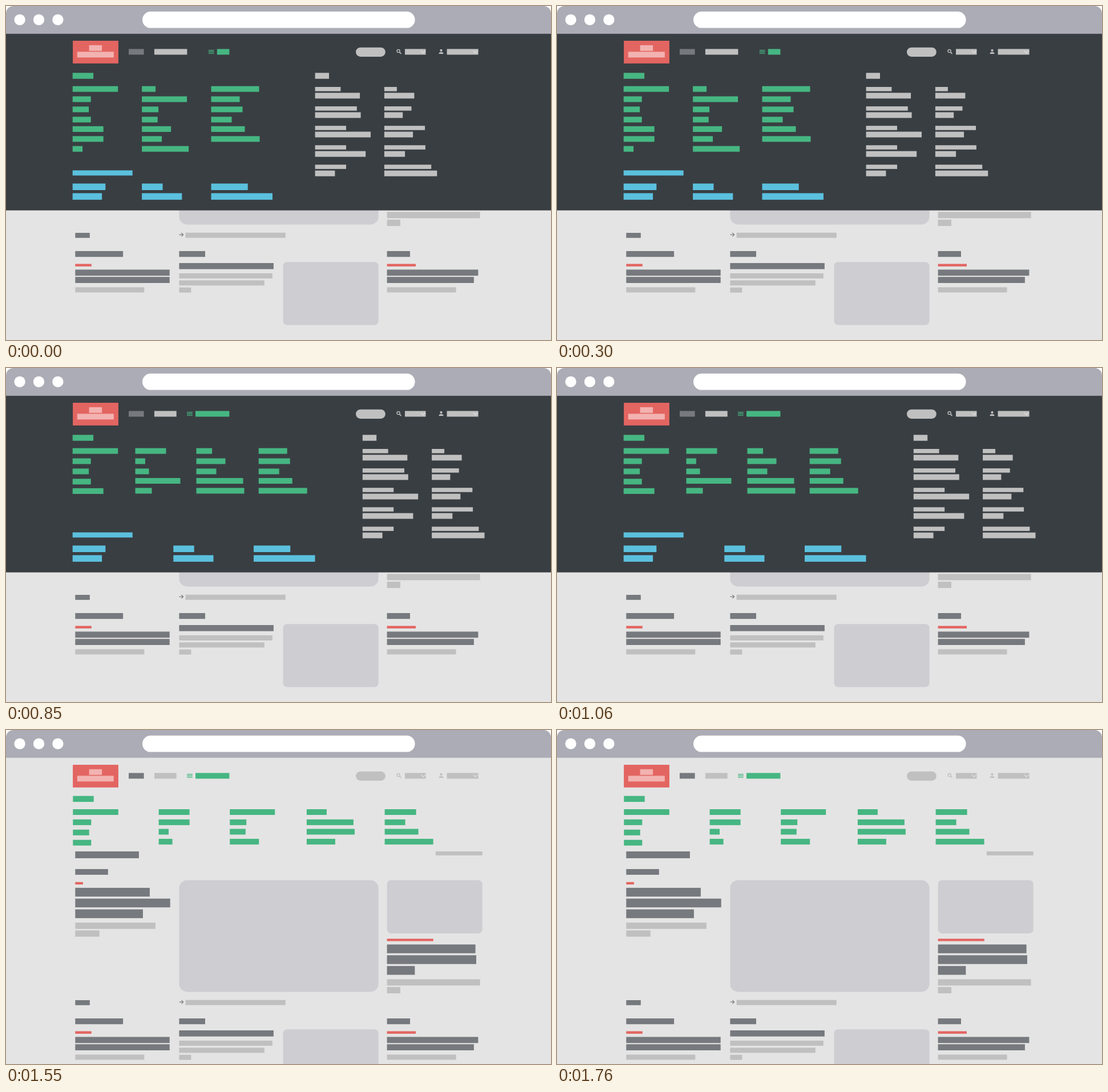
Animation, 955 px wide and 586 px high, one loop 1900 ms. Source, as an HTML page with a canvas:

```html
<!DOCTYPE html>
<html lang="en">
<head>
<meta charset="utf-8">
<title>Menu layouts</title>
<style>
  html, body { margin: 0; width: 100%; height: 100%; overflow: hidden; background: #fff; }
  canvas { display: block; width: 955px; height: 586px; }
</style>
</head>
<body>
<canvas id="stage"></canvas>
<script>
const W = 955, H = 586;
const FIRST = 500, STEP = 350, LOOP = FIRST + 4 * STEP;
const LEFT = 116.7, HEADER_Y = 75.4, BAR = 10, SCROLL = 76;

const canvas = document.getElementById('stage');
const dpr = window.devicePixelRatio || 1;
canvas.width = W * dpr;
canvas.height = H * dpr;
const ctx = canvas.getContext('2d');
ctx.scale(dpr, dpr);

const C = {
  chrome: '#acacb6', panel: '#393e42', page: '#e4e4e4', card: '#cecdd2',
  dark: '#76797d', light: '#c0c0c0', red: '#e36561', pink: '#f2b2b0',
  green: '#46b682', blue: '#5bc0de'
};

const evenly = (n, step) => Array.from({ length: n }, (_, i) => LEFT + i * step);
const wide = evenly(3, 121.4), spread = [LEFT, 293.3, 434];
const five = [LEFT, 267, 391.6, 526.3, 663];

// cols: menu columns, rows: entries per column, link and label: header bar widths
const layouts = [
  { cols: wide, rows: 7, link: 57.5, label: 21.6, blue: wide, side: 541.6, bottom: 358.6 },
  { cols: evenly(3, 132.9), rows: 7, link: 57.5, label: 41, blue: wide, side: 564.5, bottom: 358.6 },
  { cols: [LEFT, 226.5, 333.5, 442.7], rows: 5, link: 38.8, label: 59.4, blue: spread, side: 624.8, bottom: 358.6 },
  { cols: five, rows: 4, link: 38.8, label: 59.4, blue: spread, bottom: 323.6 },
  { cols: five, rows: 4, link: 38.8, label: 59.4, open: true }
];

// Entry widths, flowing down one column after another.
const entries = [79.5, 32, 28.4, 32, 54, 54, 17.4, 24, 79, 29,
                 27.6, 51, 35, 82, 84, 50, 55, 36, 59, 85];

function box(color, x, y, w, h) {
  ctx.fillStyle = color;
  ctx.fillRect(x, y, w, h);
}

// A column of bars with even spacing.
function stack(color, x, y, h, step, ...widths) {
  widths.forEach((w, i) => box(color, x, y + i * step, w, h));
}

function round(color, x, y, w, h, r) {
  ctx.fillStyle = color;
  ctx.beginPath();
  ctx.roundRect(x, y, w, h, r);
  ctx.fill();
}

function dot(color, x, y, r) {
  round(color, x - r, y - r, 2 * r, 2 * r, r);
}

function line(color, width, ...points) {
  ctx.strokeStyle = color;
  ctx.lineWidth = width;
  ctx.beginPath();
  points.forEach(([x, y]) => ctx.lineTo(x, y));
  ctx.stroke();
}

// The page sits on a four-column grid.
const col = i => 121.3 + 182.1 * i;
const span = n => 182.1 * n - 15;

function lead(x, y, tag, titles, texts) {
  box(C.red, x, y, tag, 4.2);
  stack(C.dark, x, y + 10.1, 15.4, 18.9, ...titles);
  stack(C.light, x, y + 71.1, 11, 13.7, ...texts);
}

function teaser(x, heading, tag, titles) {
  box(C.dark, x, 506, heading, 10.2);
  box(C.red, x, 528.5, tag, 4.4);
  stack(C.dark, x, 538.5, 10.7, 12.8, ...titles);
  box(C.light, x, 569.5, 121, 9);
}

function drawPage() {
  const [a, b, c, d] = [0, 1, 2, 3].map(col);
  box(C.dark, a, 213, 111.6, 12);
  box(C.light, d + span(1) - 81.8, 213, 81.8, 7);
  box(C.dark, a, 244, 57.5, BAR);

  round(C.card, b, 263.4, span(2), 196, 14);
  round(C.card, d, 263.4, span(1), 93.5, 7);
  lead(a, 266.8, 13.6, [130.6, 166.4, 118.6], [140.6, 42.4]);
  lead(d, 366.2, 81.2, [155, 156.4, 48.8], [163, 23.4]);

  box(C.dark, a, 474, 25.5, 8.8);
  line(C.dark, 1.2, [b, 477.2], [b + 7, 477.2]);
  line(C.dark, 1.2, [b + 4, 474], [b + 7.2, 477.2], [b + 4, 480.4]);
  box(C.light, b + 11.2, 473.7, 175.2, 9);

  teaser(a, 83.8, 28.5, [165.4, 165.4]);
  teaser(d, 40.4, 50.4, [159.8, 152.3]);
  box(C.dark, b, 506, 45.6, 10.2);
  box(C.dark, b, 527, 165.5, 10.7);
  stack(C.light, b, 545, 9, 12.4, 163.4, 149.4, 21);
  round(C.card, c, 525.2, span(1), 110.6, 7);
}

function dropdown(x, w, tip) {
  box(C.light, x, HEADER_Y, w, BAR);
  line(C.page, 1.1, [tip - 3.8, 78.6], [tip, 82.2], [tip + 3.8, 78.6]);
}

function drawHeader({ link, label }) {
  box(C.red, 117.1, 61, 79.8, 39.8);
  box(C.pink, 145.6, 68.8, 22.5, BAR);
  box(C.pink, 124.8, 80.3, 64, BAR);
  box(C.dark, 215, HEADER_Y, 26.6, BAR);
  box(C.light, 259.9, HEADER_Y, link, BAR);

  const x = 391.4 - label;
  stack(C.green, x - 15, 77, 1.3, 2.7, 9.8, 9.8, 9.8);
  box(C.green, x, HEADER_Y, label, BAR);

  round(C.light, 613, 72.7, 51.8, 16.2, 8.1);
  ctx.strokeStyle = C.light;
  ctx.lineWidth = 1.3;
  ctx.beginPath();
  ctx.arc(687.6, 79.1, 2.6, 0, Math.PI * 2);
  ctx.stroke();
  line(C.light, 1.7, [689.4, 80.9], [692.5, 84]);
  dropdown(699, 36.5, 731);
  dot(C.light, 762.5, 77.9, 2.1);
  round(C.light, 758.5, 81, 8, 3, [3, 3, 0, 0]);
  dropdown(772.6, 55, 822.6);
}

// Rows below the first few are set a little tighter.
function rowTop(i, loose) {
  const tight = Math.max(0, i - loose + 1);
  return 140.6 + 17.9 * i - 0.5 * tight - (tight ? 0.8 : 0);
}

function drawMenu({ cols, rows, open }) {
  ctx.save();
  if (open) ctx.translate(0.6, -1.6);
  box(C.green, LEFT, 117.3, 36.4, 10.4);
  entries.forEach((w, i) => {
    const c = Math.floor(i / rows);
    const loose = c ? Math.ceil(rows / 2) : 4;
    box(C.green, cols[c], rowTop(i % rows, loose), w, BAR);
  });
  ctx.restore();
}

function drawBlue({ blue, bottom }) {
  const y = bottom - 70.2;
  const pair = (x, ...widths) => stack(C.blue, x, y + 23.1, 11.5, 16.9, ...widths);
  box(C.blue, LEFT, y, 105, 9);
  pair(blue[0], 57.6, 51.4);
  pair(blue[1], 36.4, 70.2);
  pair(blue[2], 64.2, 107.5);
}

function drawSide(x) {
  const small = (x, ...widths) => stack(C.light, x, 142, 7.5, 34.1, ...widths);
  const large = (x, ...widths) => stack(C.light, x, 152.3, BAR, 34.1, ...widths);
  const next = x + 121.3;
  box(C.light, x, 117.3, 24.4, 10.4);
  small(x, 44.8, 73.2, 54.4, 54.4, 54.4);
  large(x, 78.5, 80, 97.4, 88.6, 34.8);
  small(next, 22, 47.6, 71.2, 72, 82.3);
  large(next, 52.5, 32.3, 50.2, 36.2, 92.4);
}

function drawChrome() {
  round(C.chrome, 0, 0, W, 48.8, [13, 13, 0, 0]);
  for (let i = 0; i < 3; i++) dot('#fff', 24.1 + 33.4 * i, 24.1, 9.7);
  round('#fff', 239, 9.8, 477.6, 28.8, 14.4);
}

function draw(time) {
  const t = time % LOOP;
  const layout = layouts[t < FIRST ? 0 : 1 + Math.floor((t - FIRST) / STEP)];
  const { open, bottom, side } = layout;
  ctx.clearRect(0, 0, W, H);
  box(C.page, 0, 48, W, H - 48);
  ctx.save();
  if (!open) ctx.translate(0, -SCROLL);
  drawPage();
  ctx.restore();
  if (!open) box(C.panel, 0, 48, W, bottom - 48);
  drawHeader(layout);
  drawMenu(layout);
  if (!open) drawBlue(layout);
  if (side) drawSide(side);
  drawChrome();
}

const start = performance.now();
function tick() {
  draw(performance.now() - start);
  requestAnimationFrame(tick);
}
tick();
</script>
</body>
</html>
```
